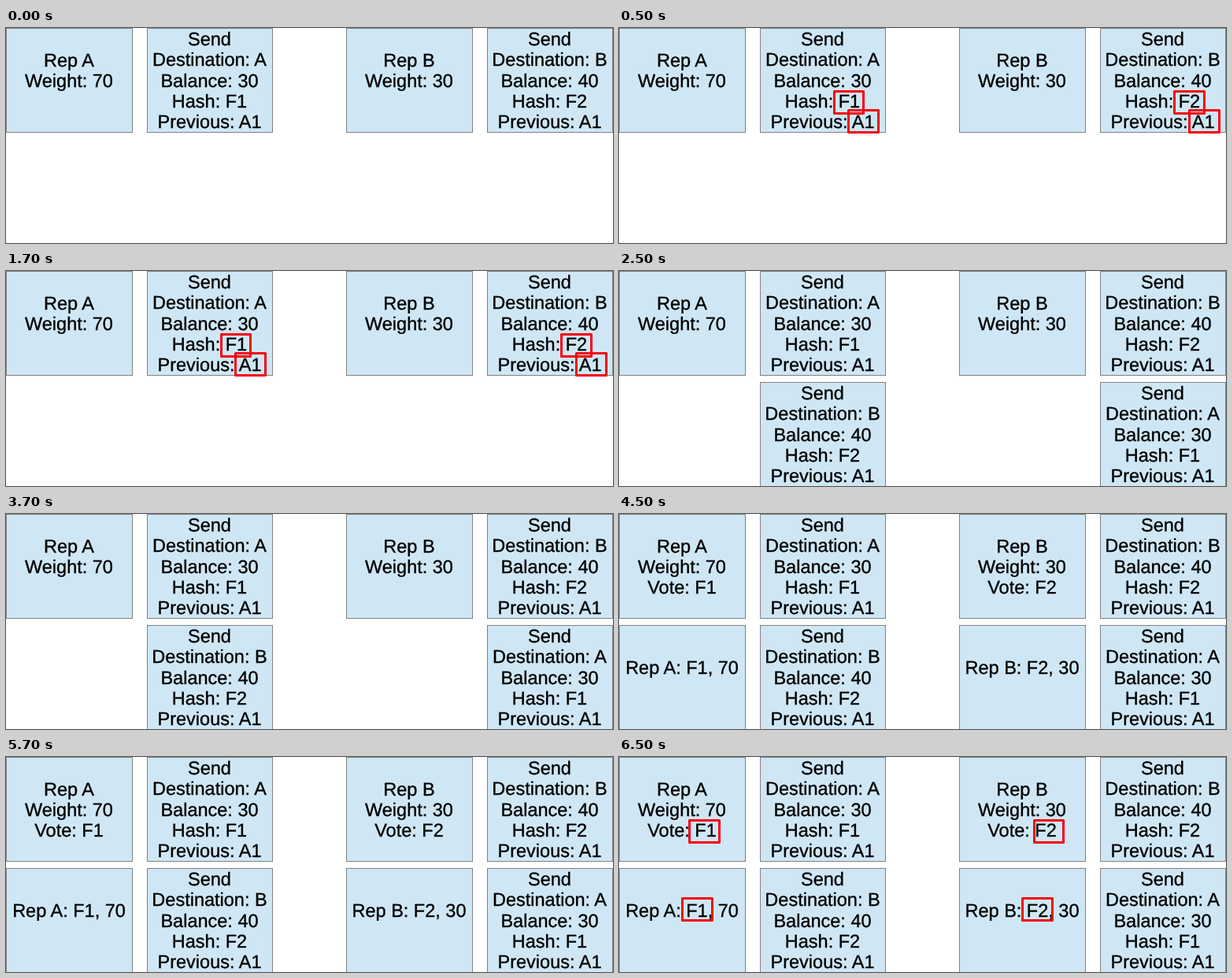
Animation of 771 by 273 pixels, one loop 8000 ms. Source, as an HTML page:

```html
<!DOCTYPE html>
<html lang="en">
<head>
<meta charset="utf-8">
<title>Representative voting</title>
<style>
  html, body { margin: 0; width: 100%; height: 100%; overflow: hidden; background: #fff; }
  svg { display: block; width: 771px; height: 273px; }
  text {
    font: 23.5px "Liberation Sans", Arial, sans-serif;
    text-anchor: middle;
    text-rendering: geometricPrecision;
    fill: #000;
    stroke: #000;
    stroke-width: 0.35;
  }
  .card { fill: #cfe7f5; stroke: #808080; }
  .mark { fill: none; stroke: #f6000e; stroke-width: 3; stroke-linejoin: round; }

  .conflict, .copies, .votes, .tally {
    visibility: hidden;
    animation: 8s step-end infinite;
  }
  .conflict { animation-name: conflict; }
  .copies { animation-name: copies; }
  .votes { animation-name: votes; }
  .tally { animation-name: tally; }
  @keyframes conflict { 0% { visibility: hidden } 6.25% { visibility: visible } 31.25%, 100% { visibility: hidden } }
  @keyframes copies { 0% { visibility: hidden } 31.25%, 100% { visibility: visible } }
  @keyframes votes { 0% { visibility: hidden } 56.25%, 100% { visibility: visible } }
  @keyframes tally { 0% { visibility: hidden } 81.25%, 100% { visibility: visible } }
</style>
</head>
<body>
<svg id="stage" viewBox="0 0 771 273"></svg>
<script>
  const stage = document.getElementById("stage");
  const LINE = 26.3, ROW = 141, REP_W = 160, SEND_W = 159;

  function add(parent, tag, attrs, text) {
    const el = document.createElementNS("http://www.w3.org/2000/svg", tag);
    for (const key in attrs) el.setAttribute(key, attrs[key]);
    if (text) el.textContent = text;
    return parent.appendChild(el);
  }

  const layer = name => add(stage, "g", { class: name });

  function label(parent, x, y, text) {
    add(parent, "text", { x, y }, text);
  }

  // Card with centred lines; `first` is the baseline of the first line.
  function card(parent, x, y, width, first, lines) {
    add(parent, "rect", { class: "card", x: x + 0.5, y: y + 0.5, width, height: 132 });
    lines.forEach((line, i) => label(parent, x + width / 2, y + first + i * LINE, line));
  }

  function send(parent, x, y, rep) {
    card(parent, x, y, SEND_W, 22, ["Send", "Destination: " + rep.name,
      "Balance: " + rep.balance, "Hash: " + rep.hash, "Previous: A1"]);
  }

  function mark(parent, x, y, width = 38) {
    add(parent, "rect", { class: "mark", x, y, width, height: 28 });
  }

  const base = layer("base"), copies = layer("copies"), votes = layer("votes");
  const conflict = layer("conflict"), tally = layer("tally");

  const reps = [
    { x: 0, name: "A", weight: 70, balance: 30, hash: "F1" },
    { x: 432, name: "B", weight: 30, balance: 40, hash: "F2" }
  ];

  reps.forEach((rep, i) => {
    const sendX = rep.x + 179;
    card(base, rep.x, 0, REP_W, 48.8, ["Rep " + rep.name, "Weight: " + rep.weight]);
    send(base, sendX, 0, rep);
    send(copies, sendX, ROW, reps[1 - i]);
    label(votes, rep.x + REP_W / 2, 101.2, "Vote: " + rep.hash);
    card(votes, rep.x, ROW, REP_W, 61.5, [`Rep ${rep.name}: ${rep.hash}, ${rep.weight}`]);
  });

  mark(conflict, 273.5, 80.5, 37);
  mark(conflict, 291.5, 104.5);
  mark(conflict, 705.5, 80.5);
  mark(conflict, 724.5, 104.5);

  mark(tally, 89.5, 80.5);
  mark(tally, 527.5, 80.5, 37);
  mark(tally, 80.5, 179.5);
  mark(tally, 512.5, 179.5);
</script>
</body>
</html>
```
